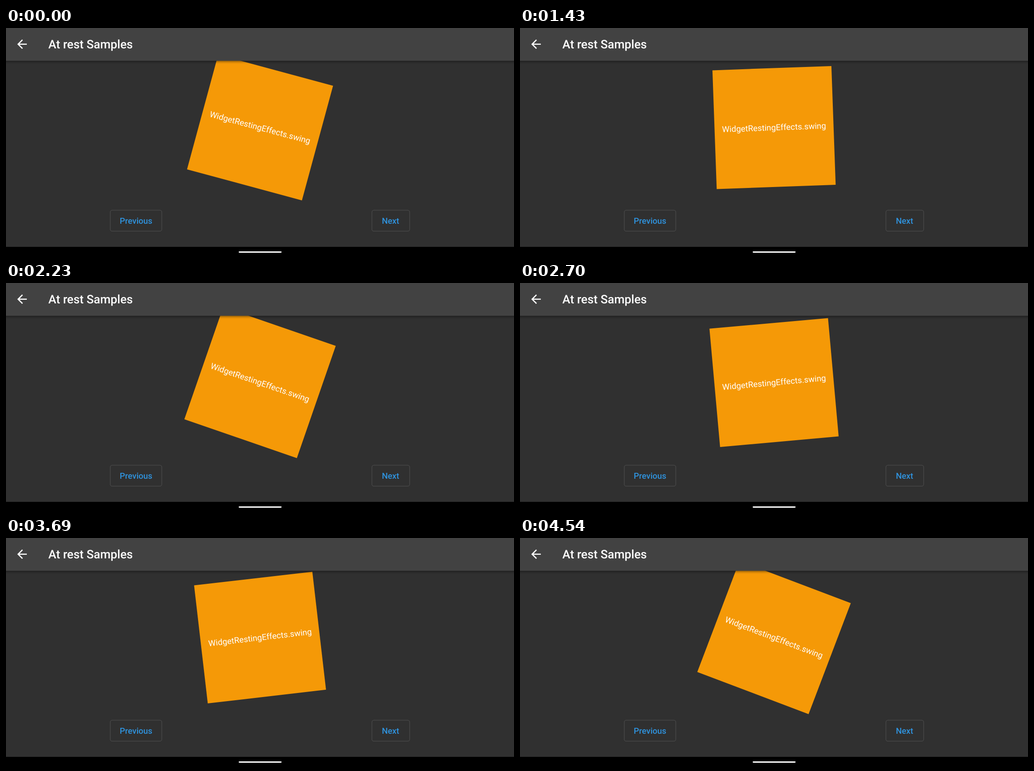
Animation, 1119 px wide and 501 px high, one loop 4.57 s. Source, as an HTML page:

```html
<!DOCTYPE html>
<html lang="en">
<head>
<meta charset="utf-8">
<title>At rest Samples</title>
<style>
  @property --phase {
    syntax: "<angle>";
    inherits: false;
    initial-value: 47.5deg;
  }

  html, body {
    margin: 0;
    width: 100%;
    height: 100%;
    overflow: hidden;
    background: #303030;
  }

  svg {
    display: block;
    width: 1119px;
    height: 501px;
    font-family: Roboto, sans-serif;
    text-rendering: geometricPrecision;
  }

  /* A pendulum: the angle is the cosine of a steadily growing phase. */
  .swing {
    transform: translate(559.6px, 219.7px) rotate(calc(22.5deg * cos(var(--phase))));
    animation: swing 4570ms linear infinite;
  }

  @keyframes swing {
    0%      { --phase: 47.5deg; }
    31.291% { --phase: 264.6deg; }
    48.796% { --phase: 391.9deg; }
    89.278% { --phase: 671.8deg; }
    100%    { --phase: 747deg; }
  }

  .label { font-size: 18.35px; fill: #fff; text-anchor: middle; }
  .title { font-size: 26.2px; font-weight: 500; fill: #fff; }
  .bar { fill: #424242; filter: drop-shadow(0 2px 2.5px rgba(0, 0, 0, .45)); }
  .button rect { fill: none; stroke: #4a4a4a; stroke-width: 1.3; }
  .button text { font-size: 18.35px; font-weight: 500; fill: #2f93de; text-anchor: middle; }
</style>
</head>
<body>
<svg viewBox="0 0 1119 501">
  <rect width="1119" height="501" fill="#303030"/>

  <g class="swing">
    <rect x="-131.1" y="-131.1" width="262.2" height="262.2" fill="#f59907"/>
    <text class="label" y="6.3">WidgetRestingEffects.swing</text>
  </g>

  <g class="button">
    <rect x="229.6" y="402.2" width="113.6" height="46.2" rx="4.5"/>
    <text x="286.4" y="431.6">Previous</text>
  </g>
  <g class="button">
    <rect x="806" y="402.2" width="83.2" height="46.2" rx="4.5"/>
    <text x="847" y="431.6">Next</text>
  </g>

  <rect class="bar" x="-10" y="-10" width="1139" height="82.4"/>
  <path fill="#fff" transform="translate(19.6 20) scale(1.311)"
        d="M20 11H7.83l5.59-5.59L12 4l-8 8 8 8 1.41-1.41L7.83 13H20z"/>
  <text class="title" x="93.2" y="45.2">At rest Samples</text>

  <rect y="483" width="1119" height="18" fill="#000"/>
  <rect x="512.6" y="493" width="94.4" height="2.9" rx="1.4" fill="#fff"/>
</svg>
</body>
</html>
```
